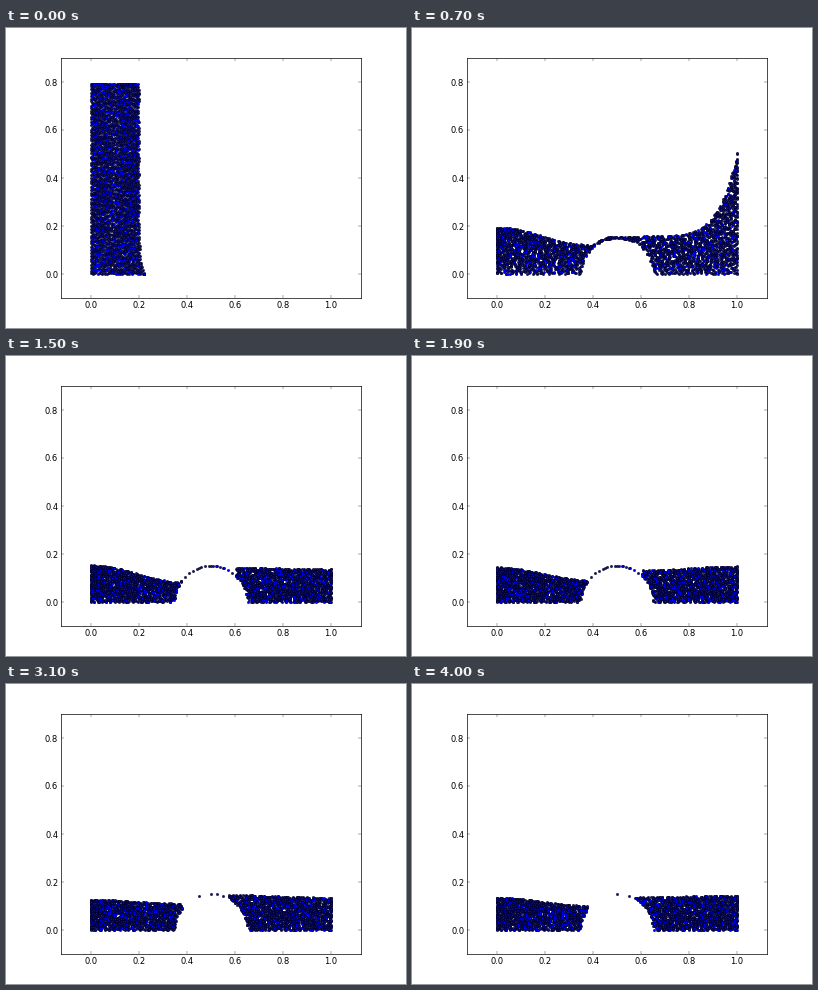
Animation, 400 px wide and 300 px high, one loop 4.1 s. Source, as a matplotlib script:

```python
import numpy as np
import matplotlib.pyplot as plt
from matplotlib.animation import FuncAnimation

FRAMES, STEP = 41, 100
COLS, ROWS, SAMPLES = 48, 64, 300
RADIUS, CENTRE = 0.15, 0.5
WIDTH, HEIGHT = 0.2, 0.793
JET, SETTLED = 4, 6     # ticks when the jet is full and when pools have formed

plt.rcParams.update({"font.family": "DejaVu Sans", "font.size": 12})
rng = np.random.default_rng(4)
P = np.linspace(0, 1, SAMPLES)


def bump(x):
    return np.sqrt(np.clip(RADIUS**2 - (x - CENTRE)**2, 0, None))


def smooth_curve(points):
    """Rounded curve through evenly spaced key points."""
    points = np.array(points)
    knots = np.linspace(0, 1, len(points))
    size = 21
    out = []
    for values in points.T:
        line = np.interp(P, knots, values)
        padded = np.pad(line, size // 2, mode="reflect", reflect_type="odd")
        out.append(np.convolve(padded, np.ones(size) / size, "valid"))
    return out


# A band of fluid is four lines: lower x, lower y, upper x, upper y.
def column_band():
    x = WIDTH * np.clip(P / 0.3, 0, 1)
    side = np.clip((P - 0.3) / 0.7, 0, 1)
    return np.array([x, 0 * P, x, HEIGHT * (1 - side)**3])


def jet_band():
    lower = smooth_curve([(0, 0), (0.12, 0), (0.23, 0), (0.345, 0),
                          (0.39, 0.105), (0.5, 0.152), (0.61, 0.12),
                          (0.7, 0.075), (0.88, 0.07), (0.99, 0.2),
                          (0.94, 0.425)])
    upper = smooth_curve([(0, 0.215), (0.1, 0.21), (0.2, 0.2), (0.3, 0.195),
                          (0.4, 0.203), (0.5, 0.215), (0.6, 0.18),
                          (0.68, 0.163), (0.85, 0.16), (0.94, 0.235),
                          (0.91, 0.435)])
    return np.array([*lower, *upper])


def pool_band(t):
    """Two sloshing pools beside the bump, with a splash on the right wall."""
    bed = bump(P)
    swing = np.interp(t, [4, 11, 19, 26, 31, 40],
                      [0.03, 0.043, 0.026, -0.016, 0.008, 0.017])
    surge = 0.06 * np.clip((9 - t) / 3, 0, 1)
    left = 0.118 + surge + swing * np.cos(np.pi * np.clip(P / 0.38, 0, 1))
    reach = np.interp(t, [7, 9, 19, 24, 26, 31], [0.5, 0.37, 0.38, 0.5, 0.5, 0.38])

    age = max(t - 11, 0)
    wave = 0.015 * np.exp(-age / 20) * np.cos(np.pi * age / 10)
    right = 0.14 + wave * np.cos(np.pi * (P - 0.6) / 0.4)
    splash = 0.38 * max(0, 1 - ((t - 6.7) / 4.3)**2)
    right += splash * np.exp((P - 1) / (0.03 + 0.025 * max(t - 5, 0)))
    start = np.interp(t, [7, 9, 22, 26], [0.5, 0.605, 0.605, 0.57])

    surface = np.where(P < reach, np.maximum(left, bed + 0.008), 0)
    surface = np.where(P > start, right, surface)
    return np.array([P, bed, P, np.maximum(surface, bed)])


COLUMN, FLYING = column_band(), jet_band()


def band_at(t):
    if t <= JET:
        a, b, k = COLUMN, FLYING, (t / JET)**1.3
    else:
        a, b = FLYING, pool_band(t)
        k = min((t - JET) / (SETTLED - JET), 1)
    return a + (b - a) * k


# Staggered lattice of particles: U runs along the band, V across it.
col, row = np.meshgrid(np.arange(COLS), np.arange(ROWS))
order = rng.permutation(col.size)
U = (col / (COLS - 1)).ravel()[order]
V = np.clip((row + 0.5 * (col % 2)) / (ROWS - 1), 0, 1).ravel()[order]
JITTER_U, JITTER_V = rng.uniform(-1, 1, (2, col.size))


def spread(band, by_length):
    """Share of the particles that lies before each sample of the band."""
    lx, ly, ux, uy = band
    area = np.abs((ux[1:] - lx[:-1]) * (uy[:-1] - ly[1:])
                  - (uy[1:] - ly[:-1]) * (ux[:-1] - lx[1:])) / 2
    length = np.hypot(np.diff(lx + ux), np.diff(ly + uy)) / 2
    share = np.concatenate([[0], np.cumsum(area + by_length * length + 1e-9)])
    return share / share[-1]


def particles(t):
    band = band_at(t)
    jet = np.interp(t, [0, JET, 8], [0, 1, 0])
    noise = np.interp(t, [0, JET, 9], [0.15, 0.15, 1])
    shear = 0.1 + 0.4 * jet

    u = np.clip(U + noise * 0.013 * JITTER_U, 0, 1)
    v = np.clip(V + noise * 0.035 * JITTER_V, 0, 1)
    u = u ** (1 + shear * v * (t > 0))
    v = v ** (1 - 0.4 * jet)

    s = np.interp(u, spread(band, 0.06 * jet), P)
    lx, ly, ux, uy = (np.interp(s, P, line) for line in band)
    x, y = lx + v * (ux - lx), ly + v * (uy - ly)
    if t < JET:
        x = x * (1 + 0.1 * (1 - t / JET) * np.exp(-y / 0.06))
    return np.column_stack([x, np.maximum(y, bump(x))])


DROPS = np.array([0.5, 0.55, 0.525, 0.45, *np.linspace(0.375, 0.605, 15)])


def drops(t):
    n = int(np.interp(t, [7, 9, 26, 31, 40], [0, 19, 19, 4, 2]))
    return np.column_stack([DROPS[:n], bump(DROPS[:n]) + 0.001])


fig = plt.figure(figsize=(8, 6), dpi=50, facecolor="white")
ax = fig.add_axes([0.1375, 0.1, 0.75, 0.8])
ax.set(xlim=(-0.125, 1.125), ylim=(-0.1, 0.9),
       xticks=np.arange(6) * 0.2, yticks=np.arange(5) * 0.2)
ax.xaxis.set_major_formatter("{x:.1f}")
ax.yaxis.set_major_formatter("{x:.1f}")
ax.tick_params(direction="in", length=4, width=0.5, pad=4, top=True, right=True)
for spine in ax.spines.values():
    spine.set_linewidth(1)
dots = ax.scatter([], [], s=10, c="blue", edgecolors="black", linewidths=0.8)


def update(i):
    dots.set_offsets(np.vstack([particles(i), drops(i)]))
    return (dots,)


anim = FuncAnimation(fig, update, frames=FRAMES, interval=STEP,
                     repeat=True, repeat_delay=0)
plt.show()
```
